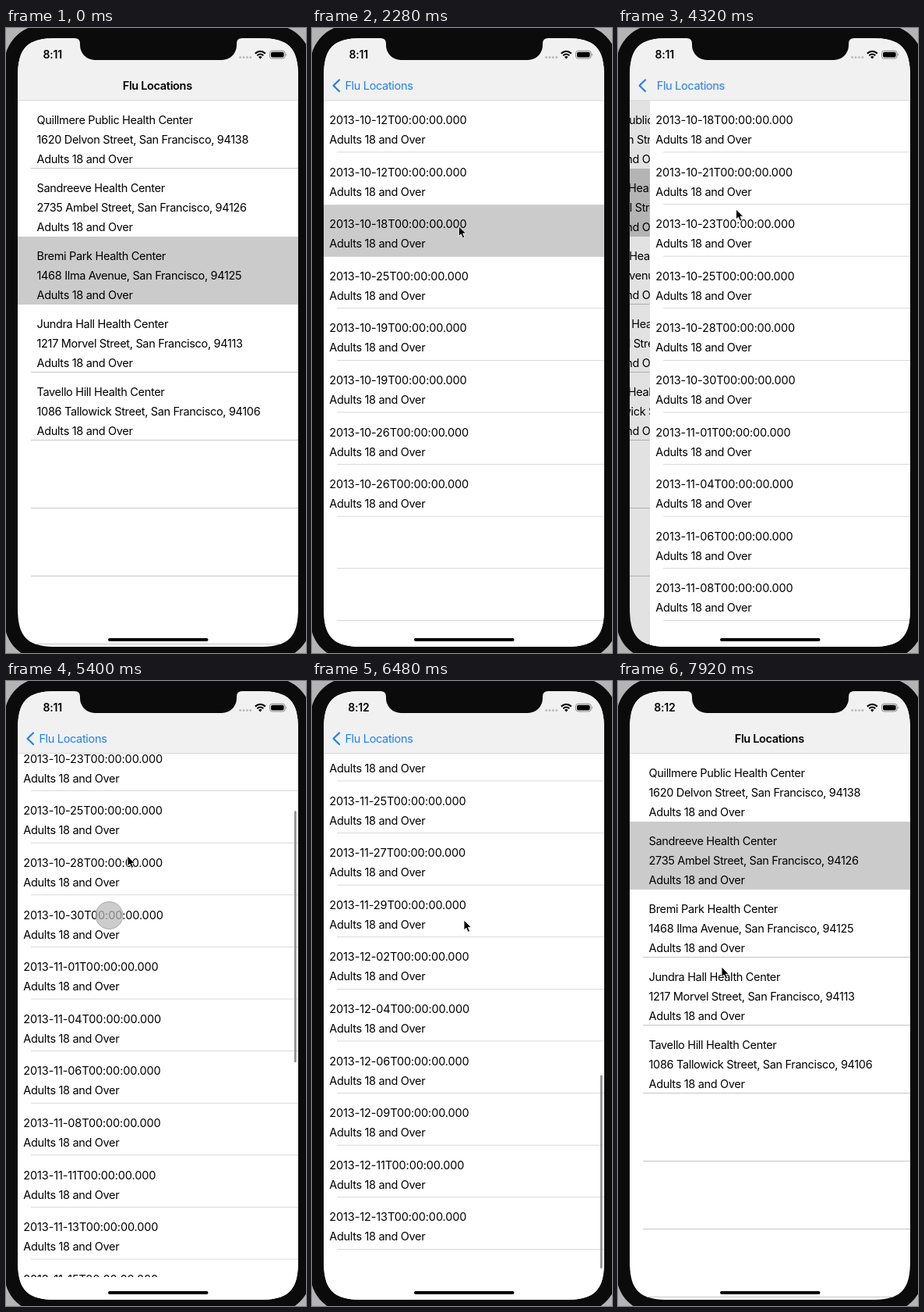
Recreate the animation shown at these times as an HTML page. Size 385 by 800 pixels, loop 8 s.

```html
<!DOCTYPE html>
<html lang="en">
<head>
<meta charset="utf-8">
<title>Flu Locations</title>
<style>
  html, body { margin: 0; width: 100%; height: 100%; overflow: hidden; background: #b4b4b4; }
  svg { display: block; width: 385px; height: 800px; }
  text { font: 14.5px Inter, "Open Sans", sans-serif; letter-spacing: -.33px; white-space: pre; }
  .date { letter-spacing: -.12px; }
  .bold { font-weight: 600; }
  .blue { fill: #1f80ee; }
  .clock { font-weight: 600; font-size: 14px; letter-spacing: -.2px; text-anchor: middle; }
</style>
</head>
<body>
<svg viewBox="0 0 385 800">
  <defs>
    <clipPath id="screenClip">
      <path d="M15 63 C15 25 27 13 65 13 H325 C363 13 375 25 375 63 V742 C375 780 363 792 325 792 H65 C27 792 15 780 15 742 Z"/>
    </clipPath>
    <clipPath id="rowClip"><rect x="0" y="93" width="360" height="670"/></clipPath>
  </defs>
  <rect width="385" height="800" fill="#b4b4b4"/>
  <rect x="-2" y="-4" width="394" height="813" rx="50" fill="#0b0b0b"/>
  <g clip-path="url(#screenClip)">
    <rect x="15" y="13" width="360" height="779" fill="#fff"/>
    <g id="list"></g>
    <rect id="dim" x="15" y="93" width="360" height="699"/>
    <g id="detail">
      <rect y="93" width="360" height="699" fill="#fff"/>
      <g clip-path="url(#rowClip)"><g id="rows"></g></g>
      <rect id="bar" x="355" width="2.6" rx="1.3" fill="#8c8c8c"/>
    </g>
    <rect x="15" y="13" width="360" height="80" fill="#f1f1f1"/>
    <rect x="15" y="92.4" width="360" height=".8" fill="#d2d2d2"/>
    <path id="chevron" d="M35 66.5 L27.5 73.8 L35 81" fill="none" stroke="#1f80ee" stroke-width="2.2" stroke-linecap="round" stroke-linejoin="round"/>
    <text id="title" class="bold" y="78.8">Flu Locations</text>
    <text id="back" class="blue" y="78.8">Flu Locations</text>
    <text id="clock" class="clock" x="59.8" y="39"></text>
    <g fill="#bdbdbd">
      <circle cx="300.6" cy="37.5" r="1.5"/><circle cx="305" cy="37.5" r="1.5"/>
      <circle cx="309.4" cy="37.5" r="1.5"/><circle cx="313.8" cy="37.5" r="1.5"/>
    </g>
    <g fill="none" stroke="#000" stroke-width="2.1">
      <path d="M319.8 32.6 Q326.3 26.9 332.8 32.6"/>
      <path d="M322.3 35.2 Q326.3 31.8 330.3 35.2"/>
    </g>
    <path d="M326.3 39.4 L324 37 Q326.3 35.2 328.6 37 Z"/>
    <rect x="338.5" y="29.2" width="19.6" height="9.8" rx="3" fill="none" stroke="#8a8a8a"/>
    <rect x="340" y="30.7" width="16.6" height="6.8" rx="1.7"/>
    <path d="M359.3 32.3 Q361.2 34.1 359.3 35.9 Z" fill="#8a8a8a"/>
    <circle id="touch" cx="132.5" r="17.5" fill="#b9b9b9" fill-opacity=".72" stroke="#999" stroke-opacity=".75"/>
    <rect x="131" y="781" width="128.5" height="4" rx="2"/>
  </g>
  <path d="M88 12 V13 Q95 13 95 20 V22 A19 19 0 0 0 114 41 H277 A19 19 0 0 0 296 22 V20 Q296 13 303 13 V12 Z" fill="#0b0b0b"/>
  <path id="cursor" d="M0 0 V13 L3 10.2 L5.2 15.3 L7.6 14.3 L5.4 9.3 H9.4 Z" stroke="#fff" stroke-width=".9"/>
</svg>
<script>
const LOOP = 8000, TICK = 120, TOP = 93, ROW = 87, SLOT = 66.6, TRACK = 665;
const WHO = 'Adults 18 and Over';
const places = [
  ['Quillmere Public Health Center', '1620 Delvon Street, San Francisco, 94138'],
  ['Sandreeve Health Center', '2735 Ambel Street, San Francisco, 94126'],
  ['Bremi Park Health Center', '1468 Ilma Avenue, San Francisco, 94125'],
  ['Jundra Hall Health Center', '1217 Morvel Street, San Francisco, 94113'],
  ['Tavello Hill Health Center', '1086 Tallowick Street, San Francisco, 94106']
];
const shortDays = ['10-12', '10-12', '10-18', '10-25', '10-19', '10-19', '10-26', '10-26'];

// Every Monday, Wednesday and Friday of the season
const longDays = [];
for (let d = 18; d <= 74; d++) {
  const day = new Date(Date.UTC(2013, 9, d));
  if ([1, 3, 5].includes(day.getUTCDay())) longDays.push(day.toISOString().slice(5, 10));
}

const $ = id => document.getElementById(id);
const set = (el, attrs) => { for (const k in attrs) el.setAttribute(k, attrs[k]); };
function add(parent, tag, attrs, words) {
  const el = document.createElementNS('http://www.w3.org/2000/svg', tag);
  set(el, attrs);
  if (words) el.textContent = words;
  parent.appendChild(el);
  return el;
}
const line = (parent, x, y, h) =>
  add(parent, 'rect', { x, y, width: 375, height: h, fill: '#c6c6c8' });

// A selected row also hides the separator above it
function shade(parent, x, y, h) {
  const g = add(parent, 'g', { opacity: 0 });
  add(g, 'rect', { x, y: y - 1, width: 360, height: 1, fill: '#fff' });
  add(g, 'rect', { x, y, width: 360, height: h, fill: '#cbcbcc' });
  return g;
}

for (let i = 1; i <= 8; i++) line($('list'), 32, TOP + i * ROW - 1, 1);
const shades = places.map(([name, address], i) => {
  const y = TOP + i * ROW, mark = shade($('list'), 15, y, ROW);
  [name, address, WHO].forEach((s, n) => add($('list'), 'text', { x: 39.5, y: y + 30 + n * 25 }, s));
  return mark;
});

function dayList(days) {
  const g = add($('rows'), 'g', {});
  for (let i = 1; i <= Math.max(days.length, 10); i++) line(g, 17, TOP + i * SLOT - 1, .65);
  const mark = shade(g, 0, TOP + 2 * SLOT, SLOT);
  days.forEach((d, i) => {
    const y = TOP + i * SLOT;
    add(g, 'text', { x: 7.3, y: y + 30, class: 'date' }, `2013-${d}T00:00:00.000`);
    add(g, 'text', { x: 7.3, y: y + 55 }, WHO);
  });
  return { g, mark };
}
const first = dayList(shortDays), second = dayList(longDays);

const clamp = v => Math.max(0, Math.min(1, v));
const fade = (t, from, span) => clamp((t - from) / span);
const smooth = u => u * u * (3 - 2 * u);

// Keys are [time, value, value...]
function follow(keys, t, ease = u => u) {
  let i = 0;
  while (i < keys.length - 2 && t >= keys[i + 1][0]) i++;
  const a = keys[i], b = keys[i + 1];
  const u = ease(fade(t, a[0], b[0] - a[0]));
  return a.slice(1).map((v, n) => v + (b[n + 1] - v) * u);
}

// Critically damped slide between the two pages
function slide(t, start) {
  const x = Math.max(0, t - start) * .014;
  const rest = (1 + x) * Math.exp(-x);
  return rest < .003 ? 1 : 1 - rest;
}

const PUSH1 = 840, POP1 = 3186, PUSH2 = 4013, POP2 = 7310;
const mouse = [
  [360, 236, 190], [720, 247, 142], [1200, 247, 142], [1920, 190, 252], [2400, 188, 254],
  [3000, 82, 77], [3360, 82.5, 76.5], [3840, 151, 230], [4320, 151.5, 232], [5400, 156, 224],
  [5880, 160, 228], [6360, 195, 306], [6720, 195, 306], [7200, 70, 76], [7440, 72, 80],
  [7860, 133, 366]
];
const scrolling = [
  [5040, 0], [5160, 12], [5280, 68], [5400, 151.5], [5520, 262], [5640, 390], [5880, 650],
  [6120, 865], [6360, 1020], [6480, 1030], [6600, 1020], [6840, 1002], [6960, 1000]
];

function draw(t) {
  const p = t < POP1 ? slide(t, PUSH1) : t < PUSH2 ? 1 - slide(t, POP1)
    : t < POP2 ? slide(t, PUSH2) : 1 - slide(t, POP2);
  const late = t >= PUSH2;
  const [scroll] = follow(scrolling, t);

  set($('list'), { transform: `translate(${-108 * p} 0)` });
  set($('dim'), { opacity: .12 * Math.pow(p, .6) });
  set($('detail'), { transform: `translate(${15 + 360 * (1 - p)} 0)` });

  const glow = [
    t >= 720 ? 1 - fade(t, 3660, 260) : 0,
    t >= 3900 ? 1 : 0,
    1 - fade(t, 150, 360)
  ];
  glow.forEach((o, i) => set(shades[i], { opacity: o }));
  set(first.mark, { opacity: t >= 2160 ? 1 : 0 });
  set(second.mark, { opacity: 0 });
  set(first.g, { display: late ? 'none' : 'inline' });
  set(second.g, { display: late ? 'inline' : 'none', transform: `translate(0 ${-scroll})` });

  // Content height is an estimate that grows as rows appear
  const total = 1373 + 292 * clamp((scroll - 150) / 850);
  const over = Math.max(0, scroll - 1000);
  const size = TRACK * TRACK / total - over * .6;
  set($('bar'), {
    y: Math.min(TOP + scroll / total * TRACK, 758 - size), height: size,
    opacity: fade(t, 5040, 120) * (1 - fade(t, 6900, 300))
  });
  set($('touch'), { cy: 451.5 - scroll, opacity: t >= 5160 && t < 5640 ? 1 : 0 });

  // The heading runs slightly ahead of the page
  const x = 149.7 - 107.3 * Math.pow(p, .94);
  set($('title'), { x, opacity: 1 - p });
  set($('back'), { x, opacity: p });
  set($('chevron'), { opacity: smooth(p) });
  $('clock').textContent = t < 6240 ? '8:11' : '8:12';

  const [mx, my] = follow(mouse, t, smooth);
  set($('cursor'), { transform: `translate(${mx} ${my})`, opacity: t < 360 ? 0 : 1 });
}

const begin = performance.now();
function frame() {
  const t = (performance.now() - begin) % LOOP;
  draw(t < 2 * TICK ? 0 : Math.floor(t / TICK) * TICK);
  requestAnimationFrame(frame);
}
frame();
</script>
</body>
</html>
```
